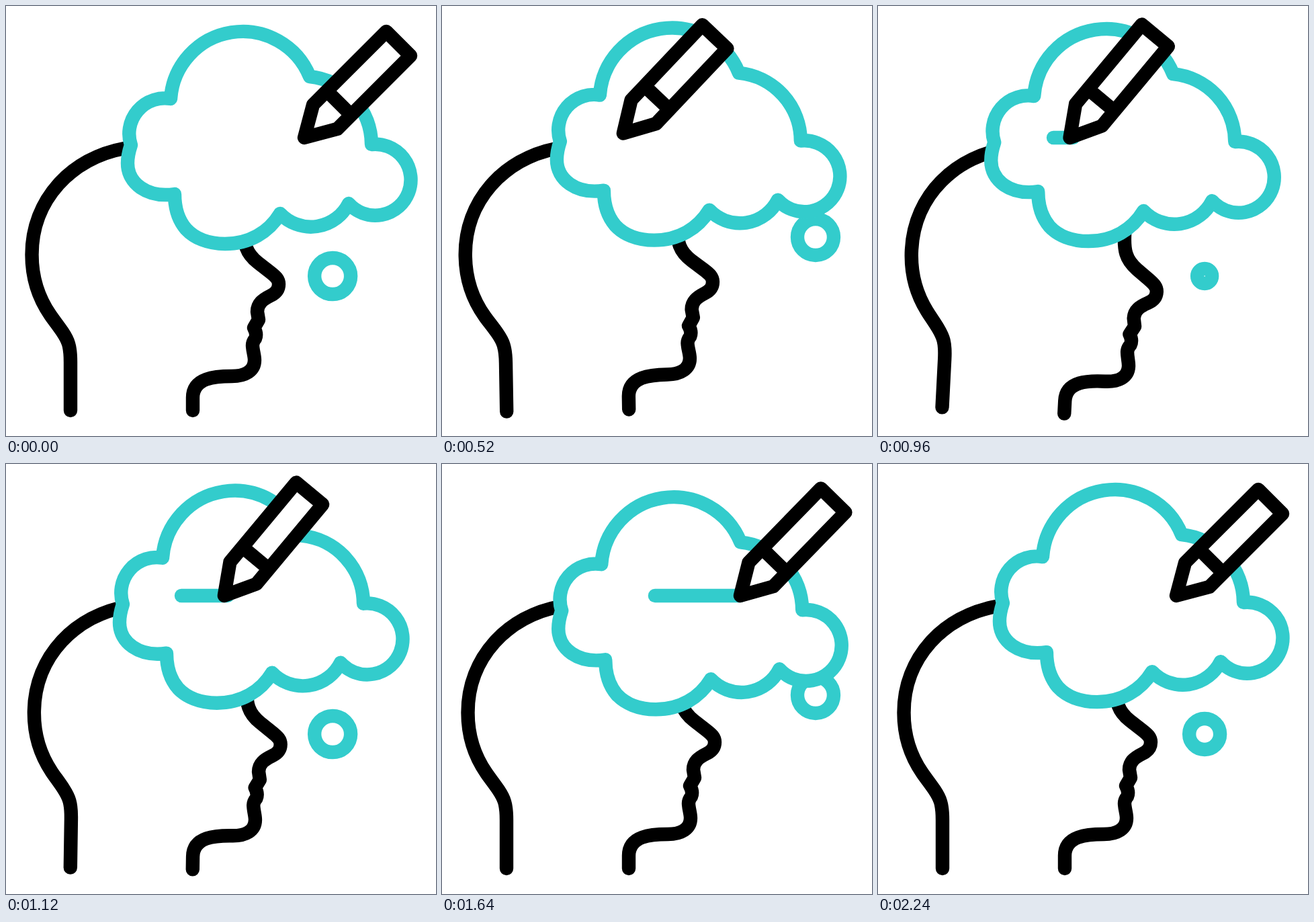
Write an HTML page that moves like this. It is 640 by 640 pixels and loops after 2280 ms.

```html
<!DOCTYPE html>
<html lang="en">
<head>
<meta charset="utf-8">
<title>Thought and pencil</title>
<style>
  html, body { margin: 0; width: 100%; height: 100%; overflow: hidden; background: #fff; }
  svg { display: block; width: 100%; height: 100%; }
  g, path, circle { stroke-width: 20.4; stroke-linecap: round; stroke-linejoin: round; }
  .ink { stroke: #000; fill: none; }
  .teal { stroke: #33cccc; fill: none; }
  .solid { fill: #fff; }
</style>
</head>
<body>
<svg viewBox="0 0 640 640">
  <g id="head" class="ink">
    <path d="M96 602V530C96 505 92 497 84 485C78 476 70 466 66 460C48 434 38.5 403 38.5 370C38.5 288 98 226 176 212L206 207"/>
    <path d="M354 330C354 354 357 368 375 382L393 396C402 403 406 407 406 414C406 422 402 427 394 431C382 437 374 443 374 455L376 467L369 479Q374 488 371 495Q367 500 367 505C367 512 370 520 370 527C370 543 356 551 336 551C312 551 278 553 278 583V602"/>
  </g>
  <circle id="bubble" class="teal"/>
  <path id="cloud" class="teal solid" d="M245 138A107.6 107.6 0 0 1 452 105A102 102 0 0 1 544 206A53 53 0 1 1 510 294A63 63 0 0 1 408 309C391 337 362 354 326 354C300 354 280 345 268 332C256 318 251 300 251 280C210 286 181 264 181 234C181 224 183 216 186 207A53 53 0 0 1 245 138Z"/>
  <path id="line" class="teal"/>
  <path id="pencil" class="ink solid" d="M0 0L44 -25.5H198V25.5H44ZM73 -25.5V25.5"/>
</svg>
<script>
  const STEP = 40, COUNT = 57, LEG = 19, HALF = 28;
  const [head, bubble, cloud, line, pencil] =
    ['head', 'bubble', 'cloud', 'line', 'pencil'].map(id => document.getElementById(id));

  const clamp = v => Math.min(1, Math.max(0, v));
  const ease = t => (1 - Math.cos(Math.PI * clamp(t))) / 2;
  const easeOut = t => 1 - (1 - clamp(t)) ** 2;
  const mix = (a, b, t) => a + (b - a) * t;

  // The head nods in, sways once and settles.
  function drawHead(f) {
    const sway = f < 8 ? ease(f / 8)
      : f < 24.5 ? Math.cos(Math.PI * (f - 8) / 8.25)
      : 1 - ease((f - 24.5) / 5.5);
    head.setAttribute('transform', `rotate(${3 * sway} 187 590)`);
  }

  // The cloud drifts around a triangle; its middle side is bowed.
  function drawCloud(f) {
    const corners = [[0, 0], [-13.1, -7], [-8.3, 12]];
    const leg = Math.floor(f / LEG), t = f / LEG - leg;
    const a = corners[leg], b = corners[(leg + 1) % 3];
    const x = mix(a[0], b[0], leg === 1 ? t * t : ease(t));
    const y = mix(a[1], b[1], ease(t));
    cloud.setAttribute('transform', `translate(${x} ${y})`);
  }

  // The bubble circles up behind the cloud, then grows again at its start.
  function drawBubble(f) {
    const [start, end] = f < HALF ? [0, HALF] : [HALF, COUNT];
    const grown = 27 - 4 * (end - f);
    const p = grown > 0 ? 0 : f - start;
    const angle = (78.5 - 4.5 * p + 0.012 * p * p) * Math.PI / 180;
    bubble.setAttribute('cx', 467 + 96 * Math.cos(angle));
    bubble.setAttribute('cy', 308 + 96 * Math.sin(angle));
    bubble.setAttribute('r', grown > 0 ? grown : 27);
  }

  // The pencil hops left, draws the line, and the line is wiped from its start.
  function drawPencil(f) {
    const back = easeOut(f / LEG);
    const stroke = clamp((f - LEG) / LEG) ** 1.28;
    const hop = Math.sin(Math.PI * back);
    const x = 444 - 193.5 * (back - stroke);
    const y = 196 - 21 * hop;
    const lean = 45 + 5.2 * (ease(f / LEG) - ease((f - 35) / 8)) - 8 * hop;
    pencil.setAttribute('transform', `translate(${x} ${y}) rotate(${-lean})`);

    const wipe = easeOut((f - 2 * LEG) / 18);
    const from = mix(261, 444, wipe);
    const to = Math.min(444, Math.max(263, x + 5));
    line.setAttribute('d', f >= LEG && wipe < 1 ? `M${from} 196H${to}` : '');
  }

  function draw(now) {
    const f = Math.floor(now / STEP) % COUNT;
    for (const part of [drawHead, drawCloud, drawBubble, drawPencil]) part(f);
  }

  let origin;
  function tick(now) {
    origin ??= now;
    draw(now - origin);
    requestAnimationFrame(tick);
  }
  draw(0);
  requestAnimationFrame(tick);
</script>
</body>
</html>
```
